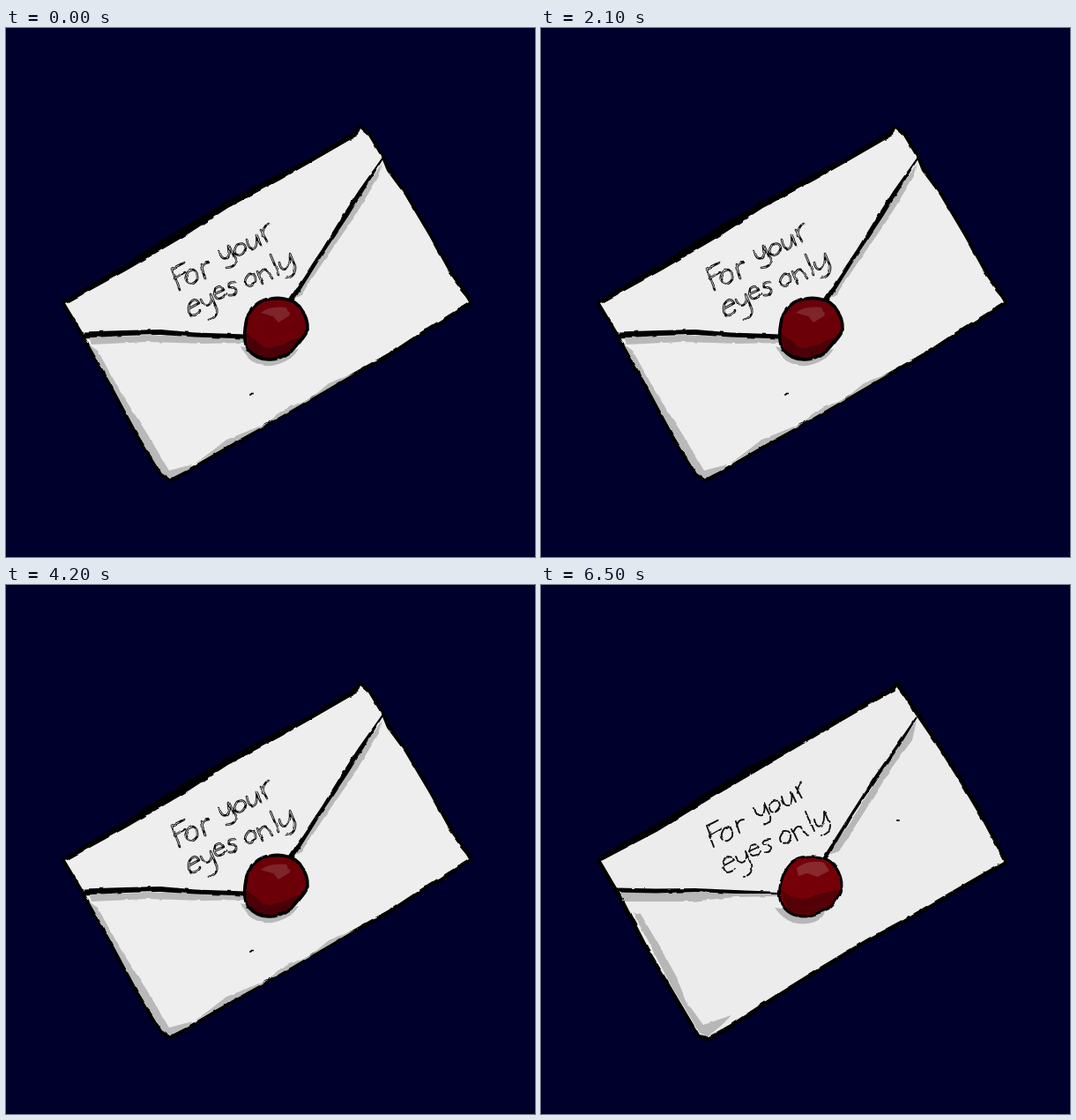
Write an HTML page that moves like this. It is 600x600 px and loops after 6600 ms.

```html
<!DOCTYPE html>
<html lang="en">
<head>
<meta charset="utf-8">
<title>Sealed envelope</title>
<style>
  html, body { margin: 0; width: 100%; height: 100%; overflow: hidden; background: #00002d; }
  svg { display: block; width: 100vw; height: 100vh; }
</style>
</head>
<body>
<svg id="stage" viewBox="0 0 600 600" role="img" aria-label="For your eyes only"></svg>
<script>
const HOLD = 100;
const stage = document.getElementById('stage');

// Handwriting, one pen path per word
const words = [
  'M188 273L197 297M188 273Q195 270 202 266M191 284L203 277' +
  'M207 276Q201 284 206 289Q212 293 217 285Q218 276 212 274L207 276' +
  'M221 268L226 284M222 274Q223 266 230 266',
  'M242 253Q244 263 250 261Q255 258 253 248M253 247L260 262Q262 271 250 272' +
  'M262 246Q257 253 261 257Q268 260 272 250Q271 242 262 246' +
  'M273 240Q275 251 280 250Q286 248 284 235M284 235L289 246' +
  'M289 229L296 242M291 236Q291 225 298 222',
  'M208 318L219 312Q214 304 208 313Q205 323 211 326Q217 326 220 321' +
  'M221 308Q225 317 230 314Q235 310 232 302M232 302L239 318Q241 328 230 331' +
  'M236 302L247 297Q243 290 237 296Q235 305 240 307Q246 307 249 302' +
  'M260 288Q251 288 253 294Q262 294 261 299Q259 304 253 303',
  'M276 279Q269 286 272 291Q278 296 283 287Q284 278 276 279' +
  'M285 277L291 290M287 281Q291 271 296 275L302 284M300 257L309 279' +
  'M310 266Q312 276 318 273Q323 268 322 258M322 256L328 270Q329 282 318 284'
].join('');

const drawings = [
  {
    paper: '#eee', shade: '#b9b9b9', outline: 8,
    sheet: 'M67 312L130 278L180 248L215 224L260 199L310 173L360 144L399 121L402 114L411 122L426 147L432 162L452 189L480 236L505 281L518 299L525 311L470 345L440 365L392 392L300 445L215 495L186 511L177 505L150 461L120 405L91 352Z',
    topEdge: [[68, 310, 5], [135, 272, 7], [200, 232, 10], [250, 201, 7], [300, 174, 7], [345, 150, 5], [398, 119, 6]],
    shadows: [
      'M94 359L104 366L130 413L160 460L185 502L211 495L208 500L186 511L177 505L150 461L120 405Z',
      'M213 495L232 481L250 467L299 447L309 436L348 418L366 403L396 391L300 447Z',
      'M94 350L180 349L270 351L271 357L225 358L160 356L97 359Z',
      'M427 154L423 168L394 216L358 268L334 304L326 307L356 261L400 190Z',
      'M266 360Q278 386 302 383Q323 379 332 364L300 370Z'
    ],
    left: [[88, 348, 7], [135, 346, 6], [175, 345, 6], [215, 348, 5], [270, 350, 5]],
    right: [[427, 148, 2], [402, 186, 5], [385, 213, 6], [360, 252, 4], [322, 311, 6]],
    seal: 'M273 330Q281 309 300 307Q322 304 333 316Q343 329 342 342Q335 354 323 367Q310 376 300 376Q285 377 274 364Q268 353 273 330Z',
    red: '#6b0008', dark: '#4a0006', glow: '#7e252a', rim: 3.6,
    dusk: 'M272 347Q284 353 290 361Q304 367 324 354Q338 350 341 343L323 367Q296 382 277 367Z',
    shine: 'M289 323Q299 315 318 317L322 326L309 334L303 327Z',
    pen: 2.6, dash: '19 1', hollow: true,
    marks: 'M516 297L527 310M278 416L280 414.5'
  },
  {
    paper: '#ededed', shade: '#b5b5b5', outline: 9,
    sheet: 'M69 314L110 290L160 262L210 231L260 201L310 173L360 143L403 115L427 150L452 190L476 224L494 259L523 309L480 335L435 361L390 389L340 419L290 449L240 482L190 512L181 510L155 466L125 415L91 351Z',
    topEdge: [[69, 311, 5], [140, 270, 7], [200, 234, 6], [260, 198, 8], [320, 164, 6], [370, 134, 6], [402, 115, 4]],
    shadows: [
      'M106 376L116 379L140 424L155 445L166 474L184 501L205 494L214 482L215 490L207 499L188 512L179 507L150 458Z',
      'M96 350L180 348L270 350L269 361L237 359L185 362L130 357Z',
      'M427 153L422 173L396 212L365 258L335 301L325 306L354 263L400 193Z',
      'M260 358L286 379Q305 390 325 377Q331 359 344 345L300 365Z'
    ],
    left: [[88, 347, 3], [135, 346, 5], [180, 347, 7], [225, 348, 6], [270, 349, 3]],
    right: [[427, 150, 3], [404, 182, 5], [380, 215, 4], [348, 262, 4], [322, 309, 4]],
    seal: 'M271 345Q275 311 299 308Q322 305 334 321Q342 334 342 344Q333 358 324 367Q304 377 295 376Q276 371 271 358Z',
    red: '#780008', dark: '#510006', glow: '#8b2a2f', rim: 3,
    dusk: 'M273 350Q286 348 295 355Q314 345 338 344L341 348L324 367Q301 380 283 371Z',
    shine: 'M293 319Q301 311 315 314Q323 319 322 329L306 331L294 328Z',
    pen: 2, dash: '16 3', hollow: false,
    marks: 'M196 509L210 502',
    glints: [['#23242a', 'M165 348L222 349M238 349L256 349'], ['#00002d', 'M405 181L410 174']]
  },
  {
    paper: '#ececec', shade: '#b7b7b7', outline: 9,
    sheet: 'M68 313L110 289L150 267L205 234L260 202L310 173L360 143L401 119L404 115L426 149L452 187L475 224L500 266L525 313L480 339L420 374L370 401L320 431L270 462L215 498L190 512L180 510L152 463L122 412L91 352Z',
    topEdge: [[68, 310, 6], [130, 276, 8], [190, 239, 8], [240, 209, 9], [300, 175, 5], [350, 146, 6], [401, 117, 5]],
    shadows: [
      'M104 371L113 373L138 416L154 445L164 471L184 499L207 491L216 488L204 500L189 512L180 508L148 455Z',
      'M91 348L180 348L270 350L268 353L220 354L170 359L92 359Z',
      'M426 154L421 176L398 207L365 260L338 302L325 307L355 262L400 191Z',
      'M265 366Q280 387 302 384Q320 382 324 366L296 370Z'
    ],
    left: [[85, 346, 5], [130, 347, 5], [175, 346, 4], [220, 348, 4], [270, 349, 2]],
    right: [[426, 150, 2], [405, 182, 4], [380, 218, 4], [350, 264, 3], [322, 310, 5]],
    seal: 'M271 343Q276 314 295 309Q321 304 333 318Q342 331 341 342Q337 357 326 367Q309 375 299 376Q281 376 273 362Q269 354 271 343Z',
    red: '#760008', dark: '#540006', glow: '#88292e', rim: 3,
    dusk: 'M272 345Q285 358 304 355Q321 348 340 345L326 367Q299 381 280 370Z',
    shine: 'M290 321Q303 311 321 315L327 324L314 331L302 327L292 330Z',
    pen: 1.9, dash: '14 3', hollow: false,
    marks: 'M404 115L414 128M93 357L87 352M404 267L405 267'
  }
];

const fill = (d, color) => `<path d="${d}" fill="${color}"/>`;
const line = (d, color, width, extra = '') =>
  `<path d="${d}" fill="none" stroke="${color}" stroke-width="${width}" stroke-linecap="round" stroke-linejoin="round" ${extra}/>`;

// Ink stroke whose width changes along its points [x, y, width]
function ink(points) {
  const sides = points.map(([x, y, w], i) => {
    const [ax, ay] = points[Math.max(i - 1, 0)];
    const [bx, by] = points[Math.min(i + 1, points.length - 1)];
    const k = w / 2 / Math.hypot(bx - ax, by - ay);
    const nx = (ay - by) * k, ny = (bx - ax) * k;
    return [[x + nx, y + ny], [x - nx, y - ny]];
  });
  const rim = [...sides.map(s => s[0]), ...sides.map(s => s[1]).reverse()];
  return fill('M' + rim.map(p => p.map(v => v.toFixed(1)).join(' ')).join('L') + 'Z', '#000');
}

function render(art, i) {
  const lettering = line(words, '#111', art.pen, `stroke-dasharray="${art.dash}"`) +
    (art.hollow ? line(words, art.paper, 0.8, 'stroke-dasharray="9 5"') : '');
  return `<filter id="rough${i}" filterUnits="userSpaceOnUse" x="0" y="0" width="600" height="600" color-interpolation-filters="sRGB">
      <feTurbulence type="fractalNoise" baseFrequency=".07" numOctaves="2" seed="${i + 4}"/>
      <feDisplacementMap in="SourceGraphic" scale="3" xChannelSelector="R" yChannelSelector="G"/>
    </filter>
    <g class="drawing" filter="url(#rough${i})">` +
    line(art.sheet, '#000', art.outline) +
    fill(art.sheet, art.paper) +
    art.shadows.map(d => fill(d, art.shade)).join('') +
    [art.topEdge, art.left, art.right].map(ink).join('') +
    line(art.marks, '#000', 2) +
    (art.glints || []).map(([color, d]) => line(d, color, 1.6)).join('') +
    fill(art.seal, art.red) + fill(art.dusk, art.dark) + fill(art.shine, art.glow) +
    line(art.seal, '#000', art.rim) + lettering + '</g>';
}

stage.innerHTML = '<rect width="600" height="600" fill="#00002d"/>' + drawings.map(render).join('');
const layers = [...stage.querySelectorAll('.drawing')];

function show(time) {
  const current = Math.floor(time / HOLD) % layers.length;
  layers.forEach((layer, i) => layer.setAttribute('display', i === current ? 'inline' : 'none'));
}

const start = performance.now();
function tick() {
  show(performance.now() - start);
  requestAnimationFrame(tick);
}
tick();
</script>
</body>
</html>
```
